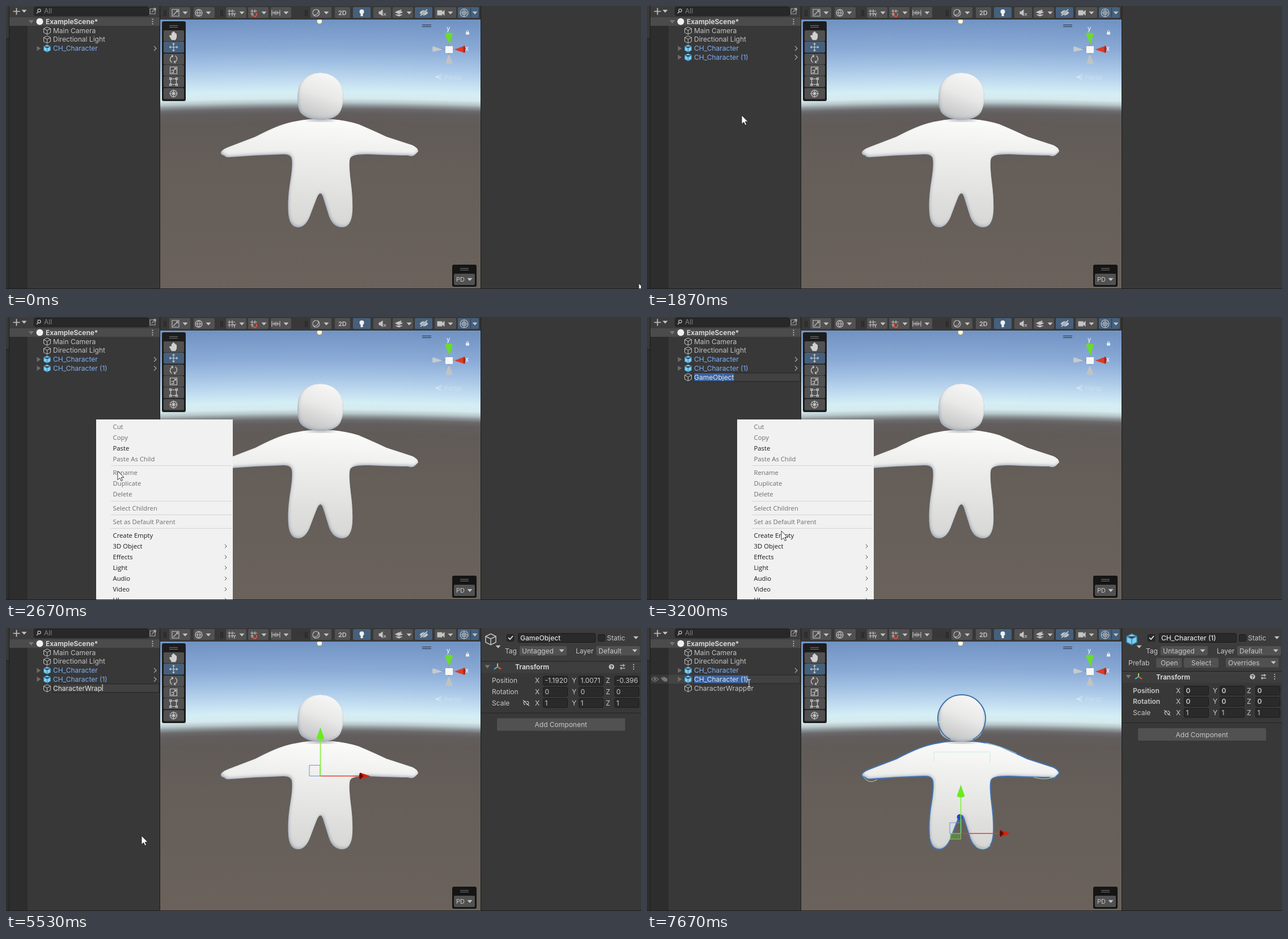
Animation of 1120x500 px, one loop 8 s. Source, as an HTML page:

```html
<!DOCTYPE html>
<html lang="en">
<head>
<meta charset="utf-8">
<style>
  html, body { margin: 0; width: 100%; height: 100%; overflow: hidden; background: #383838; }
  svg { display: block; }
  text { font: 12px Inter, sans-serif; fill: #c8c8c8; white-space: pre; }
  .b { font-weight: 600; }
  .menu text { font: 11.3px "Open Sans", sans-serif; fill: #6d6d6d; }
  .menu .on { fill: #1a1a1a; }
</style>
</head>
<body>
<svg id="stage" width="1120" height="500" viewBox="0 0 1120 500">
  <defs>
    <radialGradient id="sky" gradientUnits="userSpaceOnUse" cx="555" cy="8177" r="8152" fr="7677">
      <stop offset="0" stop-color="#6a625b"/><stop offset=".45" stop-color="#655e59"/>
      <stop offset=".62" stop-color="#615b58"/><stop offset=".655" stop-color="#625e5e"/>
      <stop offset=".67" stop-color="#6c6a6b"/><stop offset=".682" stop-color="#8b9396"/>
      <stop offset=".694" stop-color="#b6c6ca"/><stop offset=".71" stop-color="#d6eaee"/>
      <stop offset=".735" stop-color="#d4eef5"/><stop offset=".77" stop-color="#c3def1"/>
      <stop offset=".83" stop-color="#a6c4e5"/><stop offset=".9" stop-color="#8aaad6"/>
      <stop offset="1" stop-color="#7294c4"/>
    </radialGradient>
    <linearGradient id="headFill" x1=".64" y1="0" x2=".3" y2="1">
      <stop offset="0" stop-color="#f8f8f8"/><stop offset=".5" stop-color="#e8e8e7"/>
      <stop offset="1" stop-color="#c3c4c4"/>
    </linearGradient>
    <linearGradient id="bodyFill" x1=".55" y1="0" x2=".45" y2="1">
      <stop offset="0" stop-color="#fcfcfb"/><stop offset=".4" stop-color="#ececeb"/>
      <stop offset="1" stop-color="#d6d7d5"/>
    </linearGradient>
    <filter id="soft"><feGaussianBlur stdDeviation="3"/></filter>
    <path id="body" d="M379 258Q382 253 393 249L440 231Q478 211 500 206Q520 201 537 200H574Q600 202 622 209Q650 221 671 231L717 246Q727 251 727 257Q724 260 721 263Q716 267 709 264Q690 264 640 262Q610 261 607 269Q604 277 608 310Q612 340 611 363Q609 391 593 391Q577 391 570 372Q564 353 559 337Q555 325 549 337Q543 352 536 371Q528 391 515 391Q500 391 498 366Q496 340 502 306Q506 280 504 270Q502 261 488 262L440 264L395 267Q387 268 385 264Q378 263 379 258Z"/>
    <path id="head" d="M554 118C571 118 585 126 592 142C597 157 595 179 588 189C580 199 567 201 554 201C540 201 526 197 519 188C513 178 513 155 517 142C524 126 538 118 554 118Z"/>
    <clipPath id="bodyClip"><use href="#body"/></clipPath>
    <clipPath id="headClip"><use href="#head"/></clipPath>
  </defs>
  <g id="base"></g>
  <g id="live"></g>
</svg>
<script>
const LOOP = 8000, GREY = '#c4c4c4', ROW = 15.7;
const $ = id => document.getElementById(id);
const text = (x, y, s, attr = '') => `<text x="${x}" y="${y + 4.2}" ${attr}>${s}</text>`;
const rect = (x, y, w, h, fill, attr = '') =>
  `<rect x="${x}" y="${y}" width="${w}" height="${h}" fill="${fill}" ${attr}/>`;
const line = (d, stroke = GREY, width = 1.2, fill = 'none', attr = '') =>
  `<path d="${d}" stroke="${stroke}" stroke-width="${width}" fill="${fill}" ${attr}/>`;
const fill = (d, color, attr = '') => `<path d="${d}" fill="${color}" ${attr}/>`;
const dot = (x, y, r, color, stroke = 'none') =>
  `<circle cx="${x}" cy="${y}" r="${r}" fill="${color}" stroke="${stroke}" stroke-width="1.2"/>`;
const at = (x, y, s, scale = 1) => `<g transform="translate(${x} ${y}) scale(${scale})">${s}</g>`;
const down = (x, y, color = GREY) => fill(`M${x - 4.5} ${y - 2.3}h9l-4.5 5z`, color);
const button = (x, y, w, h, active) => rect(x, y, w, h, active ? '#46607c' : '#515151', 'rx="2"');
const field = (x, y, w, h) => rect(x + .5, y + .5, w - 1, h - 1, '#2a2a2a', 'stroke="#1c1c1c" rx="2"');
const cube = (x, y, color, edge, scale = 1) =>
  at(x, y, line('M0-6.5 6-3.5V3.5L0 6.5-6 3.5V-3.5ZM-6-3.5 0-.5 6-3.5M0-.5V6.5', edge, 1, color), scale);

// A form lit from the upper right: a soft lit copy slides over the shadow tone
const lit = (id, dx, dy) => `<use href="#${id}" fill="#8d98aa"/><g clip-path="url(#${id}Clip)">` +
  `<use href="#${id}" x="${dx}" y="${dy}" fill="url(#${id}Fill)" stroke="url(#${id}Fill)" stroke-width="4" filter="url(#soft)"/></g>`;

// Fixed parts: panels, toolbars, scene and figure
function drawBase() {
  const icons = [
    [299, 'M-6-6H6V6H-6ZM-4 4 4-4M1-4H4V-1'],
    [340, 'M-6 0a6 6 0 1 0 12 0a6 6 0 1 0-12 0M-6 0H6M0-6Q-5 0 0 6Q5 0 0-6'],
    [398, 'M-7-3H6M-7 2H4M-4-6V6M1-6V6M3 0 5 4 7 0M5 4V7'],
    [437, 'M-6-3H6M-6 2H0M-3-6V6M2-6V0'],
    [476, 'M-7-5V5M7-5V5M-7 0H7M-3-3V3M0-4V4M3-3V3'],
    [547, 'M-6 0a6 6 0 1 0 12 0a6 6 0 1 0-12 0M4-4Q4 4-4 4'],
    [663, 'M-5-2H-3L1-5V5L-3 2H-5ZM3 1 7 5M7 1 3 5', 1],
    [693, 'M-6-1 0-4 6-1 0 2ZM-6 3 0 6 6 3M3-6V-2M1-4H5', 1],
    [737, 'M-7 0Q0-8 7 0Q0 8-7 0Z', 1],
    [767, 'M-6-4H2V4H-6ZM2 0 6-4V4Z', 1],
    [808, 'M-7 0a7 7 0 1 0 14 0a7 7 0 1 0-14 0M-7 0H7M0-7V7M-3-3H3V3H-3Z']
  ];
  const groups = [[288, 37], [331, 37], [388, 36], [427, 36], [467, 36], [537, 37], [580, 27],
    [612, 31, 1], [648, 31], [682, 36], [721, 31, 1], [756, 38], [797, 37, 1]];
  const tools = [
    ['M-3 7-7 0-5-1-3 1V-5H-1V-7H1V-5H3V-4L5-3V3L3 7Z', 1],
    ['M-7 0H7M0-7V7M-5-2-7 0-5 2M5-2 7 0 5 2M-2-5 0-7 2-5M-2 5 0 7 2 5'],
    ['M-3 6Q-8 2-5-3L-1-6M-4-7-1-6-2-3M3-6Q8-2 5 3L1 6M4 7 1 6 2 3'],
    ['M-6-6H6V6H-6ZM-4 4H0V0H-4M0 0 4-4M1-4H4V-1'],
    ['M-5-5H5V5H-5ZM-7-7h3v3h-3zM4-7h3v3h-3zM-7 4h3v3h-3zM4 4h3v3h-3z'],
    ['M-6 0a6 6 0 1 0 12 0a6 6 0 1 0-12 0M-7 0H7M0-7V7M-3-3 3 3M3-3-3 3']
  ];
  let s = rect(0, 0, 1120, 500, '#383838') + rect(0, 58, 5, 442, '#2d2d2d') +
    rect(0, 57, 5, 1, '#1c1c1c') + rect(5, 0, 1.3, 500, '#1c1c1c') +
    rect(6, 35, 32, 465, '#2d2d2d') + rect(6, 0, 265, 20, '#3c3c3c');
  // Hierarchy header
  s += line('M12.5 9.5h12M18.5 3.5v12', GREY, 1.7) + down(32, 9) +
    rect(49.5, 1.5, 202, 15.5, '#282828', 'stroke="#1e1e1e" rx="3"') +
    dot(58.5, 8, 2.6, 'none', GREY) + line('M57 10l-3 3') + text(67, 9, 'All', 'style="fill:#858585"') +
    line('M254 5h9v9h-9zM257 11l6-6M260 4h4v4', '#a8a8a8') +
    rect(6, 20, 265, 15, '#4b4b4b') + fill('M40 25h9l-4.5 6z', '#777') +
    dot(59.5, 27.5, 6, '#f0f0f0') + text(70, 27.5, 'ExampleScene*', 'class="b" style="fill:#e2e2e2"');
  for (const y of [23.5, 27.5, 31.5]) s += dot(258.5, y, 1.1, GREY);
  // View and figure
  s += rect(271, 0, 567, 500, '#1c1c1c') + rect(272, 24, 565, 475, 'url(#sky)') +
    dot(553, 27, 4.7, '#fffbe6', '#9d9a86') + lit('body', 2, -3) +
    '<ellipse cx="555" cy="201" rx="25" ry="3" fill="#a9adb4" filter="url(#soft)" clip-path="url(#bodyClip)"/>' + lit('head', 2, -3);
  // Scene toolbar
  s += rect(272, 0, 565, 24, '#383838');
  for (const x of [279, 379, 528]) s += line(`M${x} 7v11M${x + 3} 7v11`, '#242424', 1.3);
  for (const [x, w, active] of groups) s += button(x, 2, w, 19, active);
  for (const [x, d, solid] of icons) s += at(x, 12, line(d, GREY, 1.1, solid ? GREY : 'none'));
  for (const x of [316, 357, 416, 455, 494, 565, 711, 784, 827]) s += down(x, 12);
  s += line('M731 17l12-11', '#46607c', 3) + line('M731 17l12-11', '#f0f0f0') +
    line('M436 12v4q3 6 6 0v-4', '#e0533d', 2) + text(586, 12, '2D', 'style="font-size:11px;font-weight:600"') +
    dot(627.5, 10, 4, '#f0f0f0') + rect(625.5, 13, 4, 5, '#f0f0f0') + line('M819.5 3v17', '#263b55', 1);
  // Axis widget
  s += line('M781 50V100M757 76H808', '#8d959e', 1) +
    fill('M774 49Q781 45 788 49L782 68Z', '#6bdc2e') + fill('M753 71Q751 76 753 81L770 77Z', '#c6cacd') +
    fill('M809 70Q812 76 809 83L791 77Z', '#df3a25') + fill('M808 70Q812 76 808 83Q805 76 808 70', '#a32618') +
    fill('M775 101Q782 105 788 101L781 85Z', '#bfc3c6') + rect(775, 71, 13, 12, '#f7f7f7') +
    text(777, 39.5, 'y', 'style="fill:#fff;font-size:11px"') + text(810, 74.5, 'x', 'style="fill:#fff;font-size:11px"') +
    rect(811, 46, 6, 4.5, '#e8edf2') + line('M812.5 46v-2q1.5-2 3 0v2', '#e8edf2', 1) +
    line('M768 121 758 125.5 768 130M758 125.5H768', '#dcebf4', 1.1) +
    text(773, 125.5, 'Persp', 'style="fill:#fff;font-size:11px" opacity=".25"') +
    line('M734 33.5h16M734 36.5h16', '#25303c', 1);
  // Floating tool strip
  s += rect(275, 27, 42, 141, '#1d1d1d', 'rx="3"') + line('M288 34.5h15M288 37.5h15', '#777', 1);
  tools.forEach(([d, solid], i) => {
    const y = Math.round(42.6 + i * 20.45);
    s += button(278, y, 36, 19.5, i === 1) + at(295.5, y + 9.7, line(d, '#d0d0d0', 1.1, solid ? '#d0d0d0' : 'none'));
  });
  s += rect(787, 457, 43, 39, '#151515', 'rx="3"') + line('M801 463.5h15M801 466.5h15', '#777', 1) +
    button(790, 473, 37, 20) + text(794, 483, 'PD', 'style="font-size:11px"') + down(818, 483);
  return s + rect(0, 499, 1120, 1, '#1c1c1c');
}

function hierarchy({ rows, selected, rename, typed, marked, hover }) {
  let s = '';
  rows.forEach((name, i) => {
    const y = 43.5 + i * ROW, prefab = i === 2 || i === 3, chosen = i === selected, editing = i === rename;
    if (chosen) s += rect(6, y - 8, 265, ROW, '#2c5d87');
    if (i === hover && !chosen) s += rect(6, y - 8, 265, ROW, '#fff', 'opacity=".06"');
    if (i === hover) s += line(`M8 ${y}q6-7 12 0q-6 7-12 0z`, '#777') + dot(14, y, 2, '#777') +
      fill(`M25 ${y - 4}l3 2v-2h3l5 3v5h-6l-5-5z`, '#777');
    const blue = prefab && !chosen;
    s += prefab ? cube(72.5, y, chosen ? '#fff' : '#79cdf5', chosen ? '#8fb0c8' : '#3d7fa5') : cube(72.5, y, 'none', GREY);
    if (prefab) {
      s += fill(`M54.5 ${y - 4.5}v9l7-4.5z`, '#6c6c6c');
      if (!editing) s += line(`M261 ${y - 4}l4 4-4 4`, blue ? '#b0b0b0' : '#8bb5dc');
    }
    if (editing) {
      s += rect(82.5, y - 7.5, 187.5, 15, '#414141', 'stroke="#242424"') +
        (marked ? '<rect id="mark" fill="#3a62a0" x="83" height="14"/>' : '<rect id="mark" fill="#fff" width="1" height="12"/>') +
        text(83, y, typed, 'id="edit" style="fill:#e6e6e6"');
    } else s += text(83, y, name, `style="fill:${chosen ? '#fff' : blue ? '#7fb0f5' : GREY}"`);
  });
  return s;
}

function inspector(name, prefab) {
  const dy = prefab ? 0 : -17.4, bold = prefab ? 'class="b"' : '';
  const dropdown = (x, y, w, label) => button(x, y, w, 16.5) + text(x + 4, y + 8.5, label) + down(x + w - 9, y + 8);
  let s = rect(838, 0, 282, 76 + dy, '#3c3c3c') + cube(855, 20, prefab ? '#79cdf5' : 'none', prefab ? '#3d7fa5' : GREY, 1.5) +
    down(868, 33) + field(883, 11, 13, 13) + line('M886 17l3 3 5-6', '#eee', 1.6) + field(903, 9, 137, 17) +
    text(907, 18, name, 'style="font-weight:500;fill:#e0e0e0"') + field(1044, 11, 13, 13) + text(1060, 17.5, 'Static') + down(1111, 17) +
    text(880, 40.5, 'Tag') + dropdown(906, 32, 83, 'Untagged') + text(1005, 40.5, 'Layer') + dropdown(1041, 32, 77, 'Default');
  if (prefab) s += text(849, 62, 'Prefab') + button(898, 53, 45, 17) + text(906, 62, 'Open') + button(947, 53, 61, 17) +
    text(960, 62, 'Select') + dropdown(1021, 53, 93, 'Overrides');
  let t = rect(838, 76, 282, 1, '#1f1f1f') + rect(838, 77, 282, 20, '#3e3e3e') + fill('M844.5 83h9l-4.5 6z', '#777') +
    line('M867 86v-6', '#9be04a', 2) + line('M867 86l-6 4', '#49b7f0', 2) + line('M867 86l6 4', '#f0603c', 2) +
    text(898, 86.5, 'Transform', 'class="b" style="fill:#e0e0e0"') +
    dot(1068, 86, 4.7, GREY) + text(1065.5, 86, '?', 'style="font-size:9px;font-weight:700;fill:#333"') +
    line('M1083 83.5h9M1083 88.5h9M1089 81v5M1085 86v5', GREY, 1.3);
  for (const y of [82, 86, 90]) t += dot(1107, y, 1.1, GREY);
  const values = [prefab ? [0, 0, 0] : ['-1.1920', '1.0071', '-0.396'], [0, 0, 0], [1, 1, 1]];
  ['Position', 'Rotation', 'Scale'].forEach((label, i) => {
    const y = 110.5 + i * 19.7, style = i < 2 ? bold : '';
    t += text(857, y, label, style);
    if (i === 2) t += line(`M917 ${y - 3}h-2q-4 3 0 6h1M918 ${y - 3}h2q4 3 0 6h-2M912 ${y - 5}l11 10`);
    values[i].forEach((v, k) => {
      const x = 947 + k * 63;
      t += text(x - [14, 12, 15][k], y, 'XYZ'[k]) + field(x, y - 8.5, 44, 17) +
        `<svg x="${x}" y="${y - 8}" width="43" height="16">${text(3.5, 8, v, style)}</svg>`;
    });
  });
  t += rect(838, 167, 282, 1, '#242424') + button(866, 177, 226, 22) + text(932.5, 188.5, 'Add Component');
  return s + at(0, dy, t);
}

function moveHandles(x, y, low) {
  let s = line(`M${x - 19.5} ${y - 19}h19v19h-19z`, '#5f94e6', 1);
  if (low) s += rect(x - 19, y, 19, 10, '#5d9440', 'opacity=".7" stroke="#9fe27a"') +
    dot(x - 2, y - 29, 5, '#1c48d8') + line(`M${x - 1} ${y - 25}v24`, '#2b55d6', 1);
  return s + line(`M${x} ${y}V${y - 68}`, '#7ef02c', 1.5) + fill(`M${x - 7} ${y - 66}q7 5 14 0l-7-20z`, '#6aea20') +
    line(`M${x} ${y}h72`, '#e83a2c', 1.4) + fill(`M${x + 70} ${y - 6}q-3 6 0 12l18-6z`, '#d8200c') +
    fill(`M${x + 70} ${y - 6}q-3 6 0 12l6-6z`, '#5c0f08');
}

// Selection outline with the thin collider wires
const highlight = () =>
  '<use href="#body" fill="none" stroke="#4472b0" stroke-width="2"/>' + lit('head', 2, -3) +
  line('M535 197A42 42 0 1 1 575 197', '#4672a8', 2) +
  line('M506 236V219H605V238M508 265V304H517M513 166H537M382 263Q390 277 406 268M598 203Q625 209 652 222M682 264Q705 270 720 262M499 370L515 380V388M580 386Q593 396 606 384', '#bdeecb', 1, 'none', 'opacity=".85"');

function menu(opacity) {
  const items = [[194, 'Cut'], [213, 'Copy'], [232, 'Paste', 1], [251, 'Paste As Child'], [275, 'Rename'],
    [294, 'Duplicate'], [313, 'Delete'], [337.5, 'Select Children'], [362, 'Set as Default Parent'], [386, 'Create Empty', 1]];
  ['3D Object', 'Effects', 'Light', 'Audio', 'Video', 'UI'].forEach((s, i) => items.push([405 + i * 19, s, 2]));
  let s = rect(159, 181, 241, 330, '#f1f1f1');
  for (const [y, label, on] of items) {
    s += text(188.5, y, label, on ? 'class="on"' : '');
    if (on === 2) s += line(`M386 ${y - 3.2}l3 3.2-3 3.2`, '#444', 1);
  }
  for (const y of [262, 325, 349, 373]) s += rect(185, y, 213, 1, '#d4d4d4');
  return `<g class="menu" opacity="${opacity}">${s}</g>`;
}

const PATH = [[70, 1116, 490], [600, 190, 52], [800, 153, 74], [930, 153, 74], [1200, 156, 87], [1300, 156, 87],
  [1670, 167, 193], [2400, 167, 193], [3000, 237, 378], [3270, 237, 378], [3530, 239, 367], [6400, 239, 367],
  [6930, 196, 104], [7070, 196, 104], [7270, 180, 92], [7670, 180, 97]];
const KEYS = [3600, 3870, 3930, 4130, 4270, 4400, 4600, 4670, 4800, 5070, 5330, 5470, 5530, 5670, 5730, 5870];
const NAME = 'CharacterWrapper';

function pointer(t) {
  const i = PATH.findIndex(p => p[0] > t);
  if (i === 0) return PATH[0].slice(1);
  if (i < 0) return PATH.at(-1).slice(1);
  const [a, ax, ay] = PATH[i - 1], [b, bx, by] = PATH[i];
  const k = (t - a) / (b - a), e = k * k * (3 - 2 * k);
  return [ax + (bx - ax) * e, ay + (by - ay) * e];
}

const within = (t, a, b) => t >= a && t < b;
const clamp = v => Math.max(0, Math.min(1, v));

function drawLive(t) {
  const [x, y] = pointer(t);
  const rows = ['Main Camera', 'Directional Light', 'CH_Character'];
  if (t >= 1470) rows.push('CH_Character (1)');
  if (t >= 3130) rows.push(NAME);
  const menuOpen = within(t, 2260, 3330);
  const selected = within(t, 930, 1470) ? 2 : within(t, 1470, 1870) || within(t, 7270, 7600) ? 3 : within(t, 6000, 7270) ? 4 : -1;
  const rename = within(t, 3130, 6000) ? 4 : t >= 7600 ? 3 : -1;
  const marked = t < 3600 || t >= 7600;
  const typed = t >= 7600 ? rows[3] : marked ? 'GameObject' : NAME.slice(0, KEYS.filter(k => k <= t).length);
  const hover = x < 271 && !menuOpen ? Math.floor((y - 35.5) / ROW) : -1;
  let s = hierarchy({ rows, selected, rename, typed, marked, hover });

  if (within(t, 930, 1870) || t >= 7270) {
    s += highlight() + moveHandles(553.5, 363, true) + inspector(rows[t < 1470 ? 2 : 3], true);
  } else if (within(t, 3270, 7270)) {
    s += moveHandles(554.5, 261.5, false) + inspector(t < 6000 ? 'GameObject' : NAME, false);
  }
  if (menuOpen) s += menu(Math.min(clamp((t - 2200) / 180), clamp((3330 - t) / 100)));
  s += at(x, y, t >= 7600
    ? line('M-3-6h2l1 1 1-1h2M0-5V6M-3 7h2l1-1 1 1h2', '#e8e8e8', 1)
    : line('M0 0V15.5L3.7 12.2 6.2 17.5 8.6 16.4 6.2 11.2H11Z', '#222', .9, '#fff'));
  return s + rect(0, 499, 1120, 1, '#1c1c1c');
}

// The selection or caret follows the measured width of the text
function placeMark(t) {
  const edit = $('edit');
  if (!edit) return;
  const mark = $('mark'), w = edit.getComputedTextLength(), top = edit.getAttribute('y') - 11.2;
  mark.setAttribute('y', top);
  if (t < 3600 || t >= 7600) mark.setAttribute('width', w);
  else mark.setAttribute('x', 83.5 + w);
}

$('base').innerHTML = drawBase();
const start = performance.now();
let shown = '';
function frame() {
  const t = (performance.now() - start) % LOOP, next = drawLive(t);
  if (next !== shown) {
    $('live').innerHTML = shown = next;
    placeMark(t);
  }
  requestAnimationFrame(frame);
}
frame();
</script>
</body>
</html>
```
